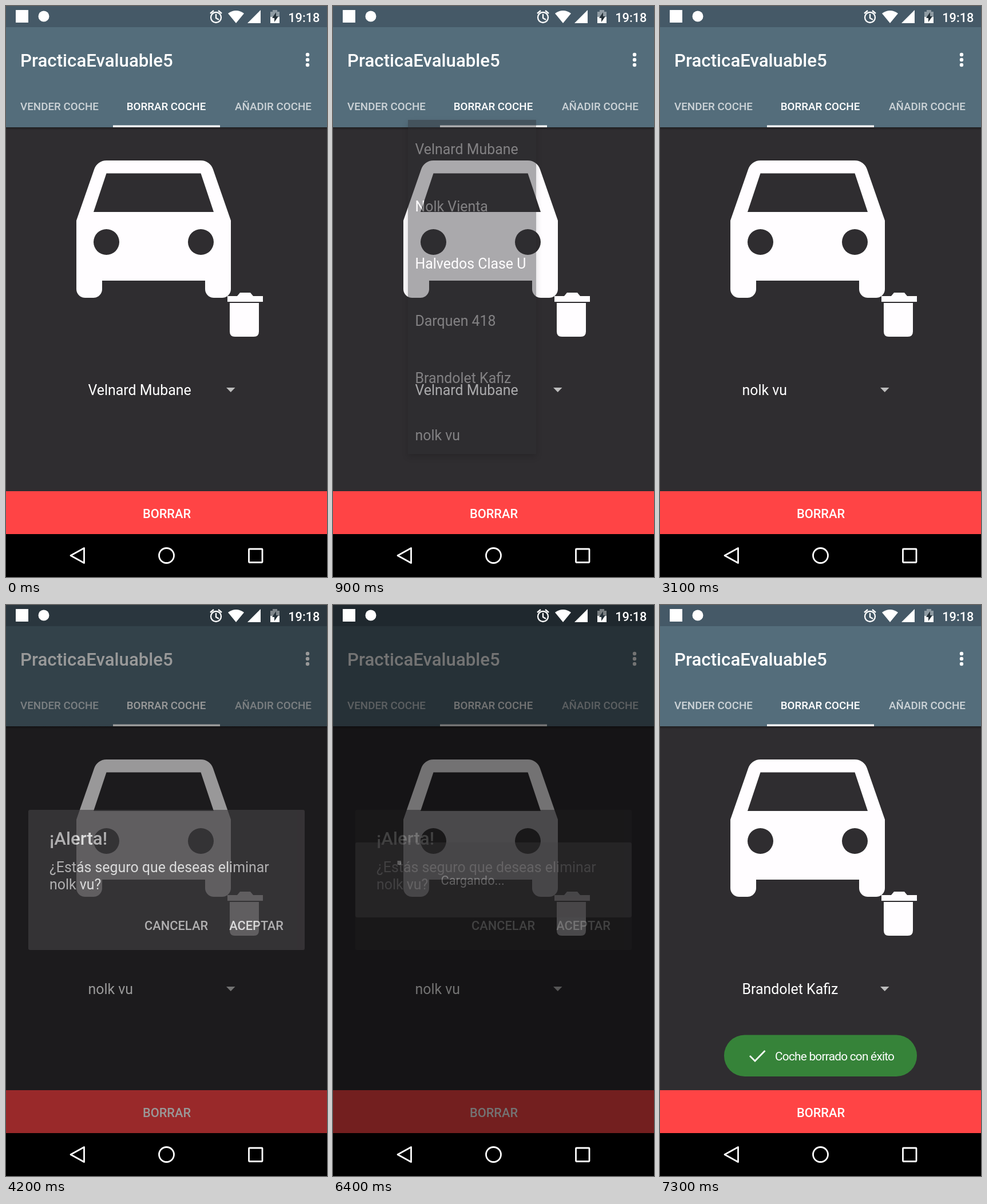
Write an HTML page that moves like this. It is 561 px wide and 998 px high and loops after 7400 ms.

```html
<!DOCTYPE html>
<html lang="es">
<head>
<meta charset="utf-8">
<title>Borrar coche</title>
<style>
  html, body { margin: 0; width: 100%; height: 100%; overflow: hidden; background: #000; }
  svg { display: block; width: 100%; height: 100%; }
  text { font: 24.9px Roboto, sans-serif; fill: #fff; }
  .title { font-size: 31.2px; font-weight: 500; }
  .button { font-size: 21.8px; font-weight: 500; }
  .tab { font-size: 18.8px; font-weight: 500; text-anchor: middle; }
  .off { opacity: .7; }
  .middle { text-anchor: middle; }
  .end { text-anchor: end; }
  .icon { fill: #fffdff; fill-rule: evenodd; }
  .line { fill: none; stroke: #fff; stroke-width: 2.8; }
  .dialog { fill: #424043; }
</style>
</head>
<body>
<svg viewBox="0 0 561 998">
  <defs>
    <filter id="shadow" x="-20%" y="-20%" width="140%" height="140%">
      <feDropShadow dx="0" dy="5" stdDeviation="6" flood-opacity=".4"/>
    </filter>
    <linearGradient id="edge" x2="0" y2="1">
      <stop stop-opacity=".35"/><stop offset="1" stop-opacity="0"/>
    </linearGradient>
    <clipPath id="listBox"><rect x="131" y="199" width="224" height="584"/></clipPath>
  </defs>

  <rect width="561" height="923" fill="#2f2d30"/>
  <rect width="561" height="38" fill="#455967"/>
  <rect y="37" width="561" height="175" fill="#546d7b"/>
  <rect y="212" width="561" height="5" fill="url(#edge)"/>
  <text class="title" x="25" y="106">PracticaEvaluable5</text>
  <g fill="#fff">
    <circle cx="527" cy="85" r="3.2"/><circle cx="527" cy="94" r="3.2"/><circle cx="527" cy="103" r="3.2"/>
    <rect x="187" y="208.5" width="187" height="3.5"/>
  </g>
  <text class="tab off" x="93.5" y="182">VENDER COCHE</text>
  <text class="tab" x="280" y="182">BORRAR COCHE</text>
  <text class="tab off" x="467" y="182">AÑADIR COCHE</text>

  <path class="icon" transform="translate(78 195) scale(15)" d="M18.92 6.01C18.72 5.42 18.16 5 17.5 5h-11c-.66 0-1.21.42-1.42 1.01L3 12v8c0 .55.45 1 1 1h1c.55 0 1-.45 1-1v-1h12v1c0 .55.45 1 1 1h1c.55 0 1-.45 1-1v-8zM5 14.5a1.5 1.5 0 0 1 3 0a1.5 1.5 0 0 1-3 0zM16 14.5a1.5 1.5 0 0 1 3 0a1.5 1.5 0 0 1-3 0zM5 11l1.5-4.5h11L19 11z"/>
  <path class="icon" d="M387 507h17l5-6h18l5 6h17v10h-62zM391 519h51v50q0 9-9 9h-33q-9 0-9-9z"/>
  <text id="selected" x="143.500" y="680"></text>
  <path d="M385 667h15.500l-7.750 8z" fill="#bdbdbd"/>
  <rect y="848" width="561" height="75" fill="#ff4445"/>
  <text class="button middle" x="281" y="894.500">BORRAR</text>

  <g id="popup">
    <rect x="131" y="199" width="224" height="584" fill="#2f2d30" filter="url(#shadow)"/>
    <g clip-path="url(#listBox)">
      <g id="items"></g>
      <rect id="thumb" x="349" width="6" height="568" fill="#757375"/>
    </g>
  </g>

  <rect id="dimLow" width="561" height="923"/>
  <g id="alert">
    <rect class="dialog" x="39" y="358" width="483" height="245" rx="3"/>
    <text class="title" x="76" y="419">¡Alerta!</text>
    <text x="76" y="467">¿Estás seguro que deseas eliminar</text>
    <text id="question" x="76" y="497"></text>
    <text class="button end" x="353" y="568">CANCELAR</text>
    <text class="button end" x="485" y="568">ACEPTAR</text>
  </g>
  <rect id="dimHigh" width="561" height="923"/>
  <g id="loading">
    <rect class="dialog" x="39" y="415" width="483" height="131" rx="3"/>
    <rect x="112.500" y="447" width="6.500" height="7" fill="#fff"/>
    <text x="188.500" y="489" style="font-size:21.800px">Cargando...</text>
  </g>

  <g id="toast">
    <rect x="112" y="751.500" width="337" height="72.500" rx="36" fill="#368339"/>
    <path class="line" d="M157 788l9 9l17.500-18"/>
    <text x="201" y="796" style="font-size:20.800px;letter-spacing:-.75px">Coche borrado con éxito</text>
  </g>

  <g fill="#fff">
    <rect x="17" y="7" width="22" height="22"/>
    <circle cx="66" cy="18" r="9.500"/>
    <path d="M388 13q14-10 28 0l-14 17zM445 7v23h-23z"/>
    <path d="M462 10h4v-3h8v3h4v9h-16z" opacity=".4"/>
    <path d="M462 19h16v11h-16z"/>
    <path d="M472 11l-7 10h4v7l7-10h-4z" fill="#26323a"/>
  </g>
  <g class="line" style="stroke-width:2.300">
    <circle cx="367" cy="20" r="9"/>
    <path d="M367 14v7l5 3M357 13l6-5M377 13l-6-5"/>
  </g>
  <text class="button end" x="548.500" y="27.500">19:18</text>
  <rect y="923" width="561" height="75"/>
  <g class="line">
    <path d="M113 960.500l23.500-13v26z" stroke-linejoin="round"/>
    <circle cx="280.500" cy="960.500" r="13"/>
    <rect x="424.500" y="949" width="23.500" height="23.500" rx="1"/>
  </g>
</svg>
<script>
const LOOP = 7400, STEP = 100;
const cars = ['Velnard Mubane', 'Nolk Vienta', 'Halvedos Clase U', 'Darquen 418', 'Brandolet Kafiz', 'nolk vu'];
const el = id => document.getElementById(id);

// Opacity of each layer as [time, value] points, joined linearly.
const layers = {
  popup: [[800, 0], [900, .4], [1000, .85], [1100, 1], [2500, 1], [2700, 0]],
  dimLow: [[4000, 0], [4300, .6], [6300, .6], [6400, 0]],
  alert: [[4000, 0], [4100, .3], [4300, 1], [6300, 1], [6400, .47], [6500, 0]],
  dimHigh: [[0, 0], [200, .6], [300, .6], [400, .216], [500, 0],
            [6300, 0], [6400, .55], [6500, .6], [6700, .6], [6800, .216], [6900, 0]],
  loading: [[0, 0], [100, .5], [200, 1], [300, 1], [400, .1], [500, 0],
            [6300, 0], [6400, .3], [6500, 1], [6700, 1], [6800, .1], [6900, 0]],
  toast: [[7100, 0], [7200, .5], [7300, 1]]
};
const scrolling = [[1800, 0], [1900, 3], [2300, 15]];

function valueAt(points, t) {
  const next = points.findIndex(p => p[0] > t);
  if (next < 0) return points.at(-1)[1];
  if (next === 0) return points[0][1];
  const [t0, v0] = points[next - 1], [t1, v1] = points[next];
  return v0 + (v1 - v0) * (t - t0) / (t1 - t0);
}

el('items').innerHTML = cars.map((car, i) => `<text x="143.5" y="${259 + 100 * i}">${car}</text>`).join('');
el('question').textContent = cars[5] + '?';

function draw(t) {
  for (const id in layers) el(id).style.opacity = valueAt(layers[id], t);
  const scroll = valueAt(scrolling, t);
  el('items').setAttribute('transform', `translate(0 ${-scroll})`);
  el('thumb').setAttribute('y', 199 + scroll);
  el('thumb').style.opacity = t < 1900 ? 0 : 1;
  el('selected').textContent = cars[t < 2500 ? 0 : t < 6700 ? 5 : 4];
}

const start = performance.now();
function tick() {
  const t = (performance.now() - start) % LOOP;
  draw(Math.floor(t / STEP) * STEP);
  requestAnimationFrame(tick);
}
tick();
</script>
</body>
</html>
```
